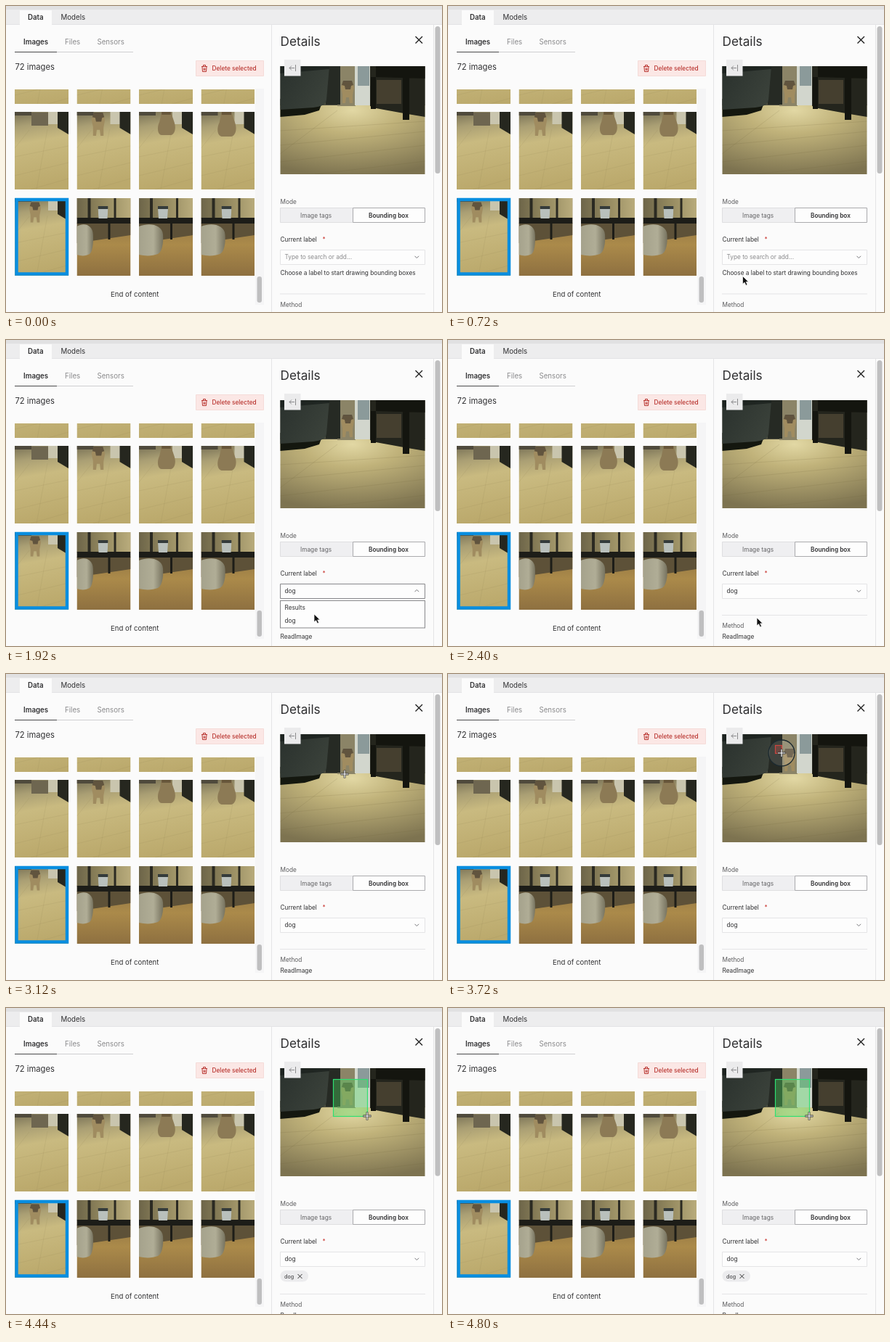
Write an HTML page that moves like this. It is 600 px wide and 422 px high and loops after 6600 ms.

```html
<!DOCTYPE html>
<html lang="en">
<head>
<meta charset="utf-8">
<title>Bounding box labelling</title>
<style>
html, body { margin: 0; width: 100%; height: 100%; overflow: hidden; background: #fbfbfb; }
svg { display: block; width: 600px; height: 422px; }
text { font: 8.25px Inter, "Open Sans", sans-serif; fill: #303032; }
.tab { font-size: 9.7px; }
.bold { font-weight: 600; }
.mid { font-weight: 500; }
.soft { fill: #8a8a8c; }
.line { fill: none; stroke: #e4e4e6; }
</style>
</head>
<body>
<svg viewBox="0 0 600 422">
  <defs>
    <linearGradient id="floor" x2=".12" y2="1">
      <stop stop-color="#777055"/><stop offset=".2" stop-color="#aa9f74"/>
      <stop offset=".42" stop-color="#c9ba80"/><stop offset="1" stop-color="#bba96c"/>
    </linearGradient>
    <linearGradient id="wood" x2="0" y2="1">
      <stop stop-color="#79633c"/><stop offset=".6" stop-color="#ab8a4a"/><stop offset="1" stop-color="#8e7040"/>
    </linearGradient>
    <linearGradient id="wall">
      <stop stop-color="#6d6549"/><stop offset=".5" stop-color="#94895f"/><stop offset="1" stop-color="#b9ac7c"/>
    </linearGradient>
    <linearGradient id="cloth">
      <stop stop-color="#a5a28c"/><stop offset=".6" stop-color="#b0ad96"/><stop offset="1" stop-color="#77735f"/>
    </linearGradient>
    <radialGradient id="hall" cx=".5" cy=".08" r=".95">
      <stop stop-color="#e2d8a4"/><stop offset=".35" stop-color="#c0b27a"/><stop offset="1" stop-color="#7d7350"/>
    </radialGradient>
    <linearGradient id="sofa" x2="1" y2=".5">
      <stop stop-color="#2a312d"/><stop offset="1" stop-color="#3a413a"/>
    </linearGradient>

    <symbol id="room" viewBox="0 0 74 107">
      <path fill="url(#floor)" d="M0 0h74v107H0z"/>
      <path fill="#4f4a3c" d="M0 0h23v5H0z"/>
      <path fill="#c9c5ae" d="M46 0h14v17H46z"/>
      <path fill="#26271f" d="M59 0h15v31l-15-9z"/>
      <path stroke="#8d7e50" stroke-width=".6" opacity=".25" fill="none"
        d="M0 62 74 47M0 88 74 70M22 107 74 92M20 25 0 50M45 24 30 107"/>
    </symbol>
    <symbol id="dog" viewBox="0 0 20 32">
      <path fill="#a08c60" d="M4 1h12l3 8-2 11v11h-4l-1-8H8l-1 8H3V19L1 9z"/>
      <path fill="#4c4233" d="M4 0h12l2 6-3 1-1 5H7L6 7 2 6z" opacity=".75"/>
    </symbol>
    <symbol id="back" viewBox="0 0 26 34">
      <path fill="#8c7a55" d="M6 0h13l5 15c3 9 0 17-5 18H6C0 32-1 22 3 14z"/>
      <path fill="#58482f" d="M6 0h13v4H6z" opacity=".7"/>
    </symbol>
    <symbol id="shelf" viewBox="0 0 74 107">
      <path fill="url(#wood)" d="M0 0h74v107H0z"/>
      <path fill="url(#wall)" d="M0 0h74v28H0z"/>
      <path fill="#2b2a22" d="M15 0h4v27h-4zM51 0h3v28h-3z"/>
      <path fill="#5d5138" d="M0 34h74v17L0 62z"/>
      <path fill="#1d1d18" d="M0 27h74v8H0zM43 34h3v23h-3z"/>
    </symbol>
    <symbol id="cup" viewBox="0 0 14 17">
      <path fill="#b9c0bc" d="M0 3h14l-1 14H1z"/>
      <path fill="#343b3b" d="M0 0h14v4H0z"/>
    </symbol>
    <symbol id="speaker" viewBox="0 0 34 44" preserveAspectRatio="none">
      <path fill="url(#cloth)" d="M0 3c15-6 32-2 33 11 1 15-2 24-7 27-8 3-17 3-26 1z"/>
    </symbol>
    <clipPath id="photo"><path d="M377.500 83h199v149h-199z"/></clipPath>
    <clipPath id="list"><path d="M12 114h330v258H12z"/></clipPath>
  </defs>

  <path fill="#fbfbfb" d="M0 0h600v422H0z"/>
  <path fill="#ededee" d="M0 0h600v25H0z"/>
  <path fill="#e1e1e2" d="M0 0h600v5H0z"/>
  <path fill="#fbfbfb" d="M19 6h44v20H19z"/>
  <path class="line" d="M0 25.500h19M63 25.500h537M365.500 26v396M588.500 26v396"/>
  <text class="tab bold" x="30" y="19">Data</text>
  <text class="tab" x="75.500" y="19">Models</text>

  <text class="tab bold" x="24" y="53">Images</text>
  <text class="tab soft" x="81" y="53">Files</text>
  <text class="tab soft" x="125.500" y="53">Sensors</text>
  <path stroke="#cfcfd1" d="M69 63.500h106"/>
  <path stroke="#4a4a4c" d="M12 63.500h58"/>
  <text x="12.500" y="88" style="font-size:11.2px">72 images</text>
  <path fill="#fbe7e5" stroke="#f5dcd9" d="M261.500 75.500h93v21h-93z"/>
  <path fill="none" stroke="#b93530" d="M269 83.500h8M271.500 83v-1.500h3V83M270 84l.5 6.500h5l.5-6.500M272.300 85.500v3.500M273.900 85.500v3.500"/>
  <text class="mid" x="283.500" y="89" style="fill:#b93530">Delete selected</text>

  <g id="grid" clip-path="url(#list)"></g>
  <path fill="none" stroke="#098ee0" stroke-width="4.500" d="M14.500 267h69.500v102.500H14.500z"/>
  <text x="144" y="400.500" style="font-size:9.6px">End of content</text>
  <path fill="#f5f5f6" d="M343 114h12v298h-12z"/>
  <rect x="345.500" y="373" width="6.500" height="36" rx="3.200" fill="#bfbfc0"/>
  <rect id="thumb" x="590.500" y="28" width="7" rx="3.500" fill="#bfbfc0"/>

  <text x="377.500" y="55" style="font-size:17.2px">Details</text>
  <path stroke="#222" stroke-width="1.400" d="m563.500 42 9.500 9.500m0-9.500-9.500 9.500"/>

  <g clip-path="url(#photo)">
    <path fill="url(#hall)" d="M377 136h200v96H377z"/>
    <path fill="#4d4d3f" d="M377 83h200v54H377z"/>
    <path fill="#8b8467" d="M456 83h25v55h-25z"/>
    <path fill="#262a24" d="M440 83h20v53h-20z"/>
    <path fill="#d2d6cd" d="M480 83h22v54h-22z"/>
    <path fill="#8b9a9a" d="M484 83h16v27h-16z"/>
    <path fill="#24251d" d="M501 83h76v70l-24-4-44-8-8-3z"/>
    <path fill="#453f2f" d="M510 102h34v33h-34z"/>
    <path fill="#14150f" d="M509 83h68v17l-68-2zM546 98h9v59h-9zM502 98h7v44h-7z"/>
    <path fill="#14170f" d="M377 128h60l-6 16-20 6-34 3z"/>
    <path fill="url(#sofa)" d="M377 83h68l-4 46c-1 7-5 9-18 11l-46 3z"/>
    <path fill="#171d1a" d="M377 83h68v4l-68 6z" opacity=".7"/>
    <use href="#dog" x="460" y="103" width="20" height="32"/>
    <path stroke="#6b613e" stroke-width=".8" opacity=".2" fill="none"
      d="M377 172 577 159M377 192 577 173M377 215 577 192M425 232 577 214M456 144 377 204"/>
  </g>
  <path fill="#ebebec" d="M383 74h22.500v22.500H383z"/>
  <path fill="none" stroke="#8b8b8d" d="M398.500 81v9M397 85.500h-7m3-3-3 3 3 3"/>

  <text x="377.500" y="272.500" style="fill:#5b5b5d">Mode</text>
  <path fill="#efeff1" stroke="#dfdfe1" d="M377.500 278.500h100v20h-100z"/>
  <path fill="#fdfdfd" stroke="#aaaaad" d="M477.500 278.500h99v20h-99z"/>
  <text x="405" y="291.500" style="fill:#626264">Image tags</text>
  <text class="bold" x="499" y="291.500">Bounding box</text>
  <text x="377.500" y="324.500">Current label</text>
  <text x="435.500" y="325" style="fill:#c8322c">*</text>

  <g id="method">
    <path class="line" d="M377 379.500h200"/>
    <text x="377.500" y="397" style="fill:#5b5b5d">Method</text>
    <text x="377.500" y="411.500">ReadImage</text>
  </g>
  <text id="help" x="377.500" y="370.500">Choose a label to start drawing bounding boxes</text>
  <g id="chip">
    <rect x="377.500" y="362" width="38.500" height="15.500" rx="7.700" fill="#ececee"/>
    <text x="383" y="372.500" style="font-size:7.2px">dog</text>
    <path stroke="#333" d="m401.500 367 6 6m0-6-6 6"/>
  </g>
  <path id="field" fill="#fdfdfd" d="M377.500 336.500h199v20h-199z"/>
  <path id="chevron" fill="none" stroke="#77777a" d="m562.500 344.800 2.800 2.800 2.800-2.800"/>
  <text id="value" x="383.500" y="349"></text>
  <path id="caret" stroke="#333" d="M384.500 341v10"/>
  <g id="popup">
    <rect id="frame" x="377.500" y="359.500" width="199" fill="#fdfdfd" stroke="#88888b"/>
    <path id="hover" fill="#f2f2f3" d="M378 377h198v19.500H378z"/>
    <text id="heading" x="383.500" y="371.500"></text>
    <text x="383.500" y="390">dog</text>
    <text id="toast" x="383.500" y="410">toast</text>
  </g>

  <rect id="box" x="450.500" y="98.500" stroke-width="1.200"/>
  <g id="cursor">
    <path id="arrow" fill="#111" stroke="#fff" stroke-width=".7" d="M0 0v11l2.600-2.300 1.900 4.100 2-.9-1.800-4h3.400z"/>
    <path id="beam" fill="none" stroke="#222" d="M-2.500-6q2.500 0 2.500 2v8q0 2-2.500 2M2.500-6Q0-6 0-4M0 4q0 2 2.500 2"/>
    <g id="cross">
      <circle id="ring" r="18" fill="#fff" fill-opacity=".12" stroke="#1c2a30" stroke-width="1.300"/>
      <path stroke="#333" stroke-width="2.800" d="M-5.500 0h11M0-5.500v11"/>
      <path stroke="#fff" stroke-width="1.200" d="M-5 0H5M0-5V5"/>
    </g>
  </g>
</svg>
<script>
const LOOP = 6600, STEP = 120;
const OPEN = 960, TYPE = 1440, PICK = 2280, DRAG = 3600, DONE = 4440;
const $ = id => document.getElementById(id);
const show = (id, on) => $(id).style.display = on ? "" : "none";
const set = (id, attrs) => { for (const k in attrs) $(id).setAttribute(k, attrs[k]); };

// Thumbnails
const cols = [12, 97.5, 183, 268.5];
const use = (id, x, y, w, h) => `<use href="#${id}" x="${x}" y="${y}" width="${w}" height="${h}"/>`;
const shelf = (x, cup, speaker) =>
  use("shelf", x, 265, 74, 107) + use("cup", x + cup, 276, 14, 17) + use("speaker", x, 301, speaker, 44);
$("grid").innerHTML =
  cols.map(x => `<svg x="${x}" y="115" width="74" height="20" viewBox="0 80 74 20">${use("room", 0, 0, 74, 107)}</svg>`).join("") +
  cols.map(x => use("room", x, 146, 74, 107)).join("") +
  `<path fill="#6e6650" d="M35 147h23v18H35z"/>` +
  use("dog", 116, 147, 22, 33) + use("back", 208, 146, 26, 33) + use("back", 290, 146, 28, 35) +
  use("room", 12, 265, 74, 107) + use("dog", 31, 269, 18, 32) +
  shelf(cols[1], 29, 23) + shelf(cols[2], 26, 34) + shelf(cols[3], 28, 34);

// Pointer path: time, x, y
const path = [
  [480, 396, 400], [960, 415, 345], [1680, 415, 345], [1920, 424, 378], [2160, 425, 383],
  [2400, 425, 383], [3000, 466, 138], [3120, 466, 138], [3480, 450, 98], [DRAG, 450, 98],
  [4080, 486, 142], [4320, 497, 149], [LOOP, 497, 149]
];
function pointer(t) {
  const i = Math.max(1, path.findIndex(p => p[0] > t));
  const [t0, x0, y0] = path[i - 1], [t1, x1, y1] = path[i];
  const k = Math.max(0, (t - t0) / (t1 - t0));
  return [x0 + (x1 - x0) * k, y0 + (y1 - y0) * k];
}

function draw(t) {
  const open = t >= OPEN && t < PICK, typed = t >= TYPE, done = t >= DONE;
  const shift = done ? 15 : typed ? 0 : 17.5;
  const [x, y] = pointer(t);
  const onPhoto = y < 232, onField = y > 336 && y < 357;

  $("value").textContent = typed ? "dog".slice(0, 1 + Math.floor((t - TYPE) / STEP)) : "Type to search or add...";
  $("value").style.fill = typed ? "#303032" : "#8a8a8c";
  set("field", { stroke: open ? "#88888b" : "#e4e4e6" });
  set("chevron", { transform: open ? "matrix(1 0 0 -1 0 692)" : "" });
  show("caret", open && !typed);
  show("popup", open);
  set("frame", { height: typed ? 37.5 : 70 });
  $("heading").textContent = typed ? "Results" : "Recently used";
  show("hover", !typed);
  show("toast", !typed);

  show("help", !typed);
  show("chip", done);
  set("method", { transform: `translate(0 ${shift})` });
  set("thumb", { height: 208 - shift * .28 });

  show("box", t > DRAG);
  set("box", {
    width: Math.max(0, x - 450), height: Math.max(0, y - 98),
    stroke: done ? "#2fe072" : "#c62b25",
    fill: done ? "#4fdc62" : "#c8352a", "fill-opacity": done ? .36 : .3
  });

  show("cursor", t >= 480);
  set("cursor", { transform: `translate(${x} ${y})` });
  show("arrow", !onPhoto && !onField);
  show("beam", onField);
  show("cross", onPhoto);
  show("ring", t >= DRAG && !done);
}

const start = performance.now();
function tick(now) {
  const t = Math.max(0, now - start) % LOOP;
  draw(Math.floor(t / STEP) * STEP);
  requestAnimationFrame(tick);
}
draw(0);
requestAnimationFrame(tick);
</script>
</body>
</html>
```
